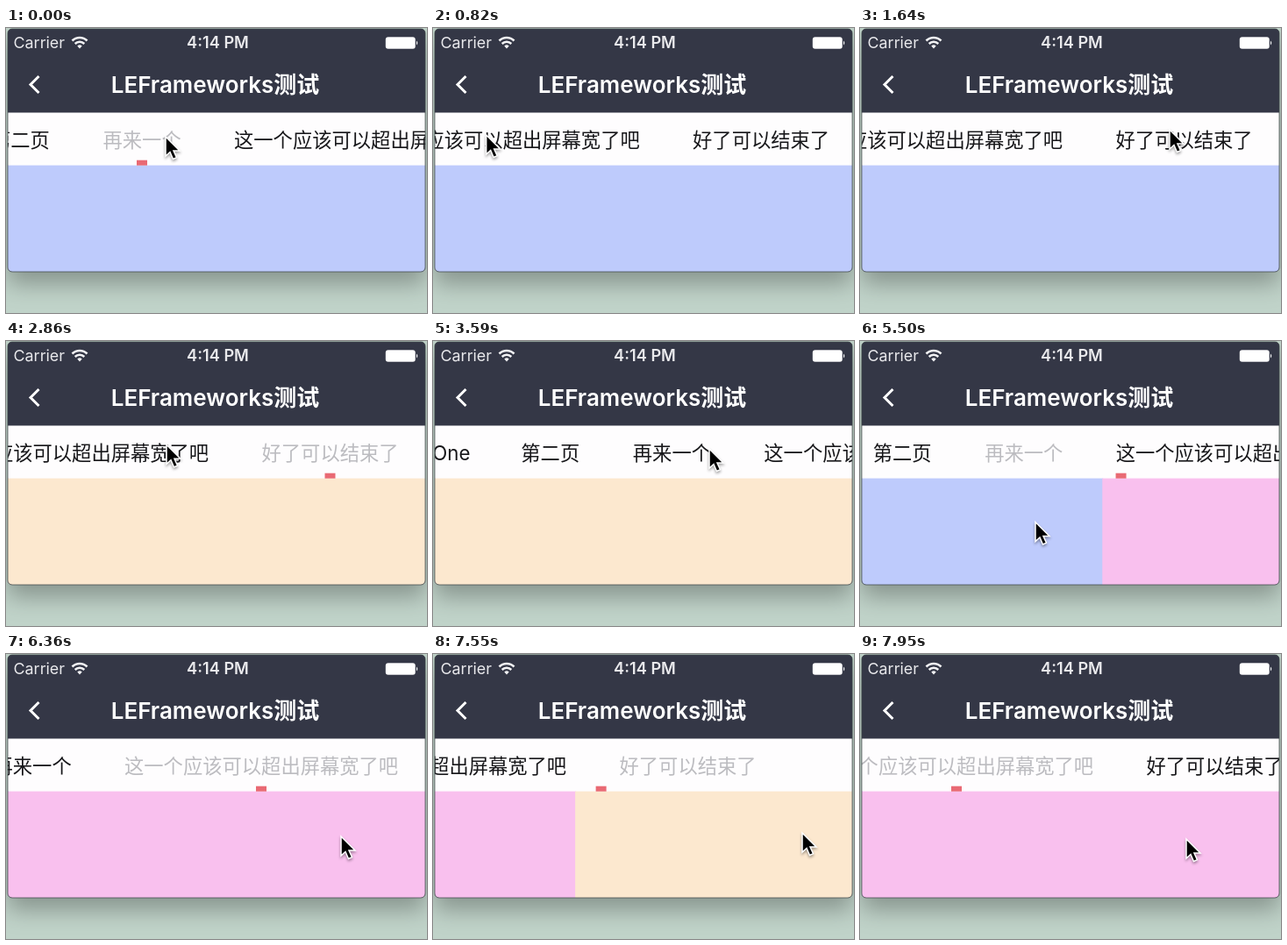
An HTML page for the animation above (8 s loop, 480 by 325 pixels).

```html
<!DOCTYPE html>
<html lang="zh">
<head>
<meta charset="utf-8">
<style>
  html, body { margin: 0; width: 100%; height: 100%; overflow: hidden; background: #c0d3c9; }
  svg { display: block; width: 480px; height: 325px; font-family: Inter, "Noto Sans CJK SC", "Noto Sans CJK", sans-serif; }
  .window { filter: drop-shadow(0 14px 13px rgba(0, 0, 0, .29)); }
  .status { font-size: 17.9px; fill: #e9e9ec; }
  .time { font-size: 18.2px; font-weight: 600; text-anchor: middle; }
  .title { font-size: 26px; font-weight: 600; fill: #fff; text-anchor: middle; }
  .title tspan { font-family: "Noto Sans CJK SC", "Noto Sans CJK", sans-serif; font-weight: 700; }
  #tabs { font-size: 22.3px; }
</style>
</head>
<body>
<svg viewBox="0 0 480 325">
  <defs><clipPath id="screen"><rect x="2" y="1" width="476" height="277" rx="5"/></clipPath></defs>
  <rect class="window" x="2" y="1" width="476" height="277" rx="5" fill="#343746"/>
  <g clip-path="url(#screen)">
    <rect width="480" height="97" fill="#343746"/>
    <text class="status" x="8.5" y="23">Carrier</text>
    <g fill="none" stroke="#f2f2f4" stroke-width="2.6">
      <path d="M75.5 14.5A12 12 0 0 1 92.5 14.5M78.7 18A7.5 7.5 0 0 1 89.3 18"/>
      <path d="M81.3 20.5A4 4 0 0 1 86.7 20.5L84 23.5Z" fill="#f2f2f4" stroke="none"/>
    </g>
    <text class="status time" x="241.5" y="23">4:14 PM</text>
    <rect x="433" y="10.5" width="33.5" height="13" rx="2.5" fill="#fff" stroke="#fff" stroke-opacity=".4"/>
    <path d="M468 14.5q2.5 2.5 0 5z" fill="#fff"/>
    <path d="M37.5 55L28 64.5L37.5 74" fill="none" stroke="#fff" stroke-width="3"/>
    <text class="title" x="238.5" y="74">LEFrameworks<tspan>测试</tspan></text>
    <rect y="96.5" width="480" height="61" fill="#fefdfe"/>
    <g id="tabs"></g>
    <g id="pages"></g>
    <rect id="marker" y="150.7" width="12" height="6" fill="#e96a74"/>
  </g>
  <rect x="2" y="1" width="476" height="277" rx="5" fill="none" stroke="#3f4648" stroke-opacity=".75"/>
  <path id="cursor" d="M0 0V22L5 17.5L8.5 25.5L12.5 23.7L9 16H16Z" stroke="#fff" stroke-width="1.5"
        style="filter:drop-shadow(0 2px 1.5px rgba(0,0,0,.35))"/>
</svg>
<script>
const LOOP = 8000, WIDTH = 477;
const $ = id => document.getElementById(id);

const tabs = [
  { label: 'One', x: 30, width: 41, color: '#c8f0d0' },
  { label: '第二页', x: 131, width: 67, color: '#f8d0d0' },
  { label: '再来一个', x: 258.5, width: 89, color: '#becbfc' },
  { label: '这一个应该可以超出屏幕宽了吧', x: 408, width: 312, color: '#f9c0ee' },
  { label: '好了可以结束了', x: 780.5, width: 156, color: '#fce8cf' }
];

function add(parent, name, attributes) {
  const node = document.createElementNS('http://www.w3.org/2000/svg', name);
  for (const key in attributes) node.setAttribute(key, attributes[key]);
  return parent.appendChild(node);
}

tabs.forEach((tab, i) => {
  tab.text = add($('tabs'), 'text', { x: tab.x, y: 135.5 });
  tab.text.textContent = tab.label;
  add($('pages'), 'rect', { x: 2 + i * WIDTH, y: 156.6, width: WIDTH + 1, height: 122, fill: tab.color });
});

const smooth = u => u * u * (3 - 2 * u);
const out = u => 1 - (1 - u) ** 3;
const linear = u => u;

// Keys are [time, value, easing into this key].
const scroll = [
  [50, 148], [350, 270, linear], [1000, 489, out],
  [2900, 489], [3200, 357, linear], [3900, 0, out],
  [5200, 0], [5500, 115, linear], [5850, 273, out],
  [6450, 273], [6750, 364, linear], [7100, 489, out],
  [7250, 489], [7550, 568, linear], [7950, 454, smooth]
];
const page = [
  [1720, 2], [2080, 4, smooth],
  [4050, 4], [4400, 2, smooth],
  [5200, 2], [5500, 2.42, linear], [5850, 3, out],
  [6450, 3], [6750, 3.42, linear], [7100, 4, out],
  [7250, 4], [7550, 3.67, linear], [7900, 3, out]
];
const cursorX = [
  [50, 182], [350, 60, linear], [800, 60], [1550, 353],
  [2150, 353], [2800, 183], [2900, 183], [3200, 315, linear],
  [4500, 315], [5150, 400], [5200, 400], [5500, 200, linear],
  [5750, 200], [6300, 382], [6450, 382], [6750, 181, linear],
  [7200, 264], [7250, 264], [7550, 421, linear], [7900, 372]
];
const cursorY = [
  [50, 124], [800, 122], [1550, 116], [2150, 116], [2800, 118],
  [3200, 123], [4500, 123], [5150, 206], [6300, 208], [7550, 204], [7900, 211]
];

function sample(keys, time) {
  const next = keys.findIndex(key => key[0] > time);
  if (next === 0) return keys[0][1];
  if (next < 0) return keys[keys.length - 1][1];
  const [t0, v0] = keys[next - 1], [t1, v1, ease = smooth] = keys[next];
  return v0 + (v1 - v0) * ease((time - t0) / (t1 - t0));
}

function draw(now) {
  const time = now % LOOP;
  const offset = sample(scroll, time), position = sample(page, time);
  const index = Math.min(Math.floor(position), tabs.length - 2);
  const center = tab => tab.x + tab.width / 2;
  const from = center(tabs[index]), to = center(tabs[index + 1]);
  const markerX = from + (to - from) * (position - index) - offset - 6;

  tabs.forEach((tab, i) => tab.text.setAttribute('fill', i === Math.round(position) ? '#bcbcc0' : '#17171a'));
  $('tabs').setAttribute('transform', `translate(${-offset})`);
  $('pages').setAttribute('transform', `translate(${-position * WIDTH})`);
  $('marker').setAttribute('x', markerX);
  $('cursor').setAttribute('transform', `translate(${sample(cursorX, time)} ${sample(cursorY, time)})`);
  requestAnimationFrame(draw);
}
requestAnimationFrame(draw);
</script>
</body>
</html>
```
